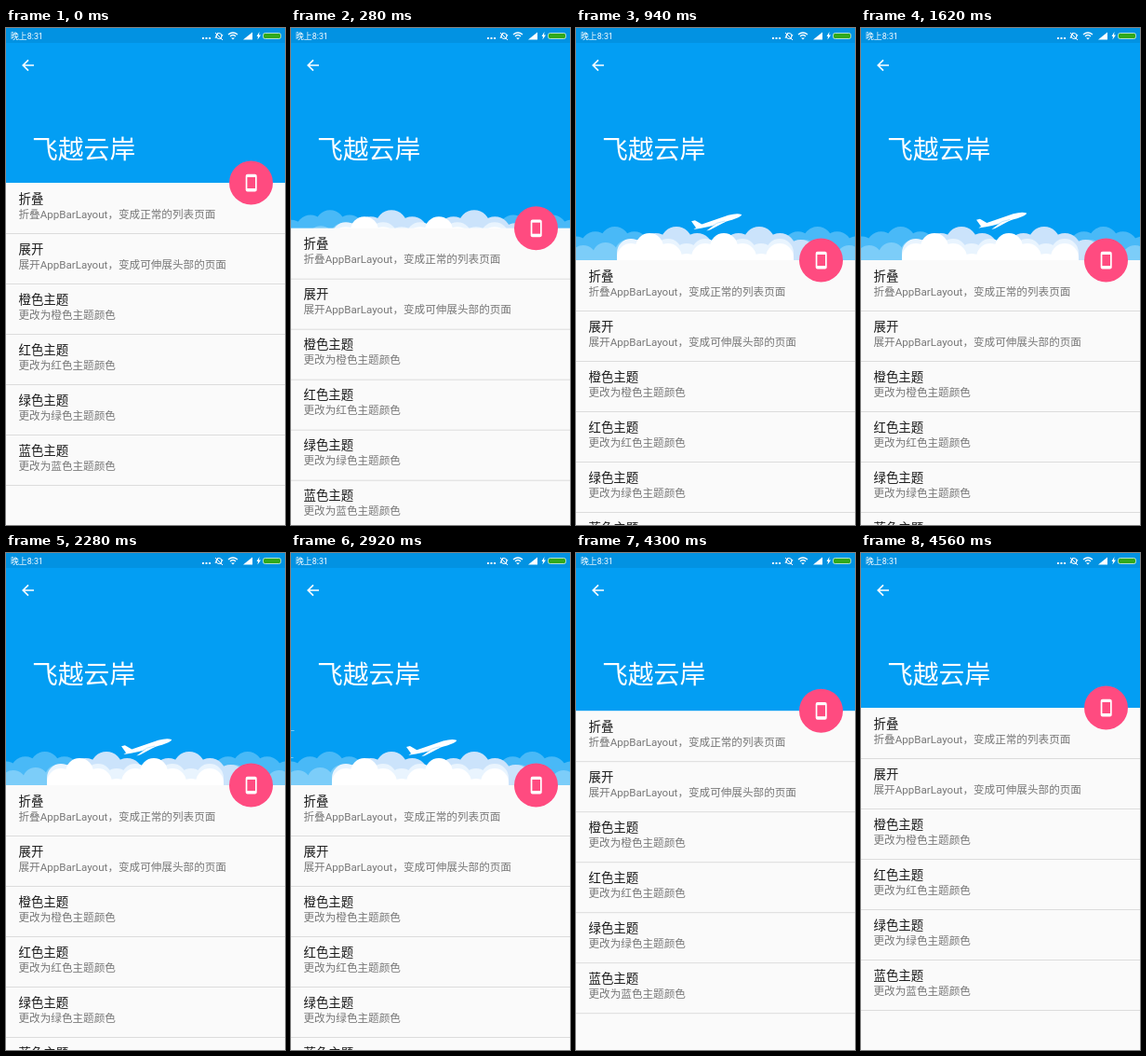
Recreate the animation shown at these times as an HTML page. Size 300 px wide and 533 px high, loop 4.58 s.

```html
<!DOCTYPE html>
<html lang="zh-CN">
<head>
<meta charset="utf-8">
<title>Pull to refresh</title>
<style>
  html, body { margin: 0; width: 100%; height: 100%; overflow: hidden; background: #fafafa; }
  svg { display: block; width: 300px; height: 533px; }
  text { font-family: Roboto, "Noto Sans CJK SC", "Noto Sans CJK", sans-serif; }
  .name { font-size: 13.4px; fill: #1a1a1a; }
  .hint { font-size: 11.6px; fill: #777; }
</style>
</head>
<body>
<svg viewBox="0 0 300 533">
  <rect width="300" height="533" fill="#039ef3"/>
  <path id="wind" d="M0 190.5H23M0 219.5H22" stroke="#fff" stroke-opacity=".45"/>
  <g id="side" fill="#fff" fill-opacity=".28"></g>
  <g id="centre"></g>
  <g id="jet" fill="#fff">
    <path d="M28 0Q24-3 14-3L-16-1-22-7H-26L-23 1-26 2Q-10 4 8 3 28 3 28 0Z"/>
    <path d="M8 1 0 2-13 7H-9L9 3Z"/>
    <path d="M9 2 0 2-6 4" fill="none" stroke="#9ad7fa" stroke-width=".6"/>
  </g>

  <g fill="#fff">
    <rect width="300" height="16" fill="#0292e2"/>
    <text x="5" y="12" font-size="8.9">晚上8:31</text>
    <path d="M211 11H220" stroke="#fff" stroke-width="2" stroke-dasharray="2 1.5"/>
    <g fill="none" stroke="#fff">
      <circle cx="229" cy="8.500" r="3"/>
      <path d="M225 5 233 13M225 11 228 5M230 12 233 7"/>
      <path d="M239 7Q244 3 249 7M241 9Q244 6 247 9" stroke-width="1.400"/>
    </g>
    <path d="M242 10.500H246L244 12.500ZM255 12.500H265V4.500Z"/>
    <path d="M272.500 4 269.500 9H271L270.500 12.500 274 7.500H272Z"/>
    <rect x="276.500" y="5.500" width="19" height="6" rx="2" fill="#32a91c" stroke="#d9f3ee" stroke-width=".8"/>
  </g>

  <path d="M30 40H18.500M24 34.300 18.300 40 24 45.700" fill="none" stroke="#fff" stroke-width="1.700"/>
  <text x="28" y="139.500" font-size="27.800" fill="#fff">飞越云岸</text>

  <g id="list"><rect width="300" height="540" fill="#fafafa"/></g>
  <g id="fab">
    <circle cx="263.500" r="23.500" fill="#ff4b80"/>
    <rect x="257.700" y="-9.300" width="12" height="18.800" rx="2" fill="#fff"/>
    <rect x="259.400" y="-6" width="8.600" height="12" fill="#ff4b80"/>
  </g>
</svg>
<script>
const LOOP = 4580, TOP = 166, PULL = 83, MAX = 117;
const RELEASE = 580, SETTLED = 920, DONE = 4000, CLOSED = 4540;

const $ = id => document.getElementById(id);
const place = (id, transform) => $(id).setAttribute('transform', transform);
const span = (t, a, b) => Math.min(1, Math.max(0, (t - a) / (b - a)));
const decelerate = k => 1 - (1 - k) ** 4;
const smooth = k => (1 - Math.cos(Math.PI * k)) / 2;

function add(parent, tag, attrs, text = '') {
  const el = document.createElementNS('http://www.w3.org/2000/svg', tag);
  for (const key in attrs) el.setAttribute(key, attrs[key]);
  el.textContent = text;
  parent.append(el);
  return el;
}

const themes = ['橙色', '红色', '绿色', '蓝色'].map(c => [c + '主题', `更改为${c}主题颜色`]);
const rows = [
  ['折叠', '折叠AppBarLayout，变成正常的列表页面'],
  ['展开', '展开AppBarLayout，变成可伸展头部的页面'],
  ...themes
];
rows.forEach(([name, hint], i) => {
  const y = i * 54;
  add($('list'), 'text', { x: 13.5, y: y + 21.5, class: 'name' }, name);
  add($('list'), 'text', { x: 13.5, y: y + 37.5, class: 'hint' }, hint);
  add($('list'), 'rect', { y: y + 54, width: 300, height: 1, fill: '#dcdcdc' });
});

// A row of round puffs whose height above the base follows top(x)
function bank(id, from, to, step, r, top, attrs = {}) {
  let d = '';
  for (let x = from; x <= to; x += step) {
    d += `M${x - r} ${r - top(x)}a${r} ${r} 0 0 1 ${2 * r} 0V60H${x - r}Z`;
  }
  return add($(id), 'path', { d, ...attrs });
}
const ripple = (mean, swing, peak, period) =>
  x => mean + swing * Math.cos((x - peak) / period * 2 * Math.PI);

for (const transform of ['', 'translate(302 0) scale(-1 1)']) {
  bank('side', -21, 105, 21, 16, x => 36 - Math.abs(x - 42) / 4, { transform });
  bank('side', -16, 80, 24, 14, x => 22 - Math.abs(x - 56) / 8, { transform });
}
bank('centre', 63.5, 242, 22.25, 17, ripple(29, 7, 108, 89), { fill: '#cbe3fb' });
bank('centre', 59, 220, 20, 15, ripple(23, 5, 79, 80), { fill: '#e9f4fe' });
bank('centre', 59, 220, 20, 15, ripple(18, 11, 79, 80), { fill: '#fff' });

function pullAt(t) {
  if (t < RELEASE) return MAX * smooth(span(t, 40, RELEASE));
  if (t < DONE) return MAX - (MAX - PULL) * decelerate(span(t, RELEASE, SETTLED));
  return PULL * (1 - decelerate(span(t, DONE, CLOSED)));
}

function draw(t) {
  const pull = pullAt(t), edge = TOP + pull;
  const hidden = Math.max(0, 1 - pull / PULL), over = Math.max(0, pull / PULL - 1);
  const wave = Math.cos((t - 1620) / 2280 * 2 * Math.PI) * span(t, RELEASE, SETTLED);

  place('list', `translate(0 ${edge})`);
  place('fab', `translate(0 ${edge})`);

  const base = edge + 40 * hidden;
  place('side', `translate(${wave * .7} ${base})`);
  place('centre', `translate(150 ${base}) scale(${1 + .5 * over}) translate(-150 0)`);

  // The jet enters from the lower left and leaves to the upper right
  const dir = t < DONE ? -1 : 1;
  const x = 151 + dir * 190 * hidden;
  const y = 207 - dir * 42 * hidden - 1.2 * wave;
  place('jet', `translate(${x} ${y}) rotate(${-15 + 25 * over})`);

  // A gust crosses from right to left at half a pixel per millisecond
  const gust = t < 3200 ? 2282 : 3458;
  place('wind', `translate(${t < gust ? 400 : 300 - (t - gust) / 2} 0)`);
}

const origin = performance.now();
function tick() {
  draw((performance.now() - origin) % LOOP);
  requestAnimationFrame(tick);
}
tick();
</script>
</body>
</html>
```
